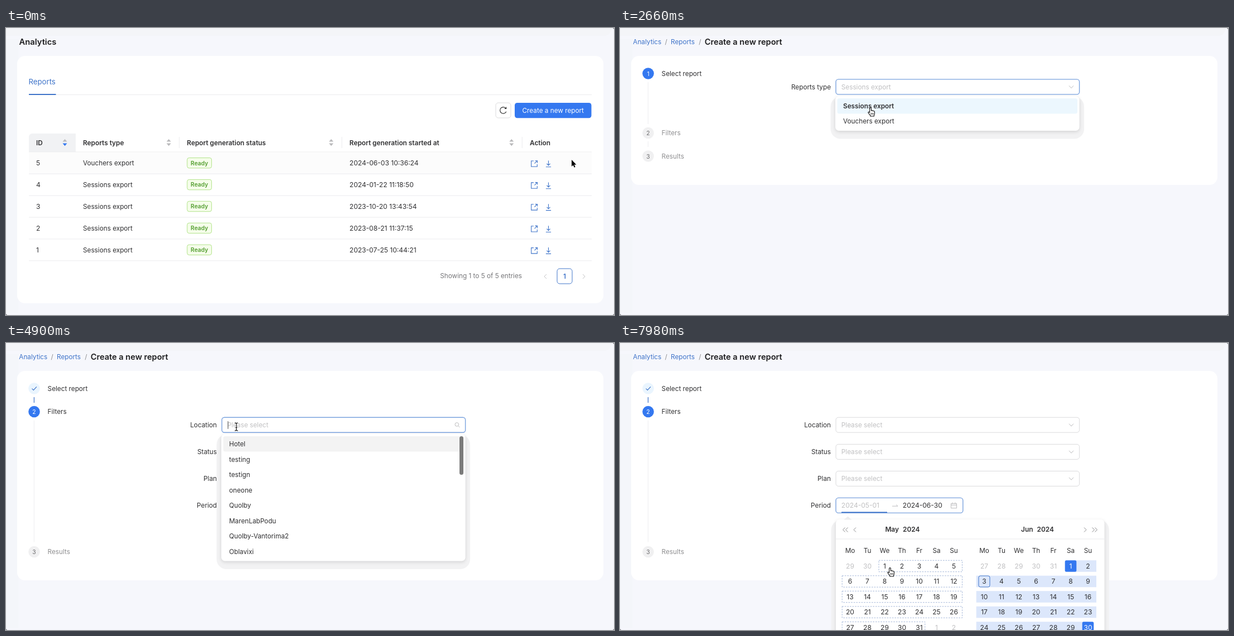
An HTML page with a canvas for the animation above (8 s loop, 1090 by 514 pixels).

```html
<!DOCTYPE html>
<html lang="en">
<head>
<meta charset="utf-8">
<title>Create a new report</title>
<style>
html, body { margin: 0; width: 100%; height: 100%; overflow: hidden; background: #f6f7fc; }
canvas { display: block; width: 1090px; height: 514px; }
</style>
</head>
<body>
<canvas id="stage" width="1090" height="514"></canvas>
<script>
const ctx = document.getElementById('stage').getContext('2d');
const LOOP = 8000, TICK = 70;
const INK = '#303032', MUTED = '#8f8f91', HINT = '#c0c0c2', LINE = '#dadadc', RULE = '#ececee';
const BLUE = '#3478f0', LINK = '#3f74c9', FOCUS = '#7ba3de';

// moments of the story, in ms
const PAGE2 = 1400, LIST1_OPEN = 2380, LIST1_CLOSE = 2940, STEP2 = 3780, LOADED = 4340,
  LIST2_OPEN = 4550, LIST2_CLOSE = 5670, CAL_OPEN = 6160, PREV_MONTH = 6930;

// pointer path: time, x, y
const PATH = [
  [0, 1014, 236], [140, 1030, 250], [280, 900, 303], [420, 640, 310], [560, 420, 255],
  [660, 335, 195], [740, 350, 152], [840, 365, 180], [910, 349, 200], [980, 400, 227],
  [1120, 760, 195], [1260, 984, 147], [1400, 984, 147], [1680, 770, 112], [1750, 770, 112],
  [1960, 379, 92], [2100, 240, 84], [2240, 300, 96], [2380, 440, 106], [2590, 447, 136],
  [2660, 449, 143], [2730, 462, 161], [2800, 455, 150], [2940, 455, 150], [3150, 560, 180],
  [3430, 770, 160], [3570, 797, 154], [3780, 790, 156], [4060, 506, 170], [4340, 440, 158],
  [4550, 412, 150], [4830, 412, 150], [4900, 413, 150], [5040, 413, 150], [5250, 440, 205],
  [5390, 455, 235], [5600, 420, 150], [5740, 420, 150], [6090, 424, 291], [6510, 424, 291],
  [6720, 421, 334], [7280, 421, 335], [7490, 430, 380], [7700, 470, 430], [7910, 484, 403], [7980, 484, 403]
];

const ICONS = {
  open: 'M-1-5H-5.3V5.3H5.3V1M1.5-5.3H5.5V-1.3M5.3-5.1L.5-.3',
  down: 'M0-5.5V3M-3 0L0 3L3 0M-4.6 5.8H4.6',
  reload: 'M5.3 2.2A5.8 5.8 0 1 1 4.6-3.6M5.2-6V-3.1H2.3',
  chevron: 'M-4-2.2L0 2.2L4-2.2',
  search: 'M2.6-.9A3.3 3.3 0 1 1-4-.9A3.3 3.3 0 1 1 2.6-.9M1.8 1.7L4.4 4.3',
  check: 'M-4 .2L-1.2 3L4.4-3.2',
  to: 'M-5 1.2H5L2.2-1.4',
  date: 'M-5-3.6H5V4.8H-5ZM-5-.8H5M-2.4-5.4V-2.6M2.4-5.4V-2.6',
  cross: 'M-1.9-1.9L1.9 1.9M1.9-1.9L-1.9 1.9',
  left: 'M2-4L-2 0L2 4',
  right: 'M-2-4L2 0L-2 4'
};
for (const k in ICONS) ICONS[k] = new Path2D(ICONS[k]);
const ARROW = new Path2D('M0 0V12L2.8 9.4L4.7 13.8L6.6 13L4.7 8.7H8.4Z');
const HAND = new Path2D('M-1.4 1a1.4 1.4 0 0 1 2.8 0V5q1.3-.8 2.2.3q1.3-.6 2 .5q1.7-.2 1.8 1.4V10q0 2-1 3.4V15H-.2V13.6L-3.6 9.3q-1.1-1.6.3-2q.9-.1 1.9 1.2Z');
const BEAM = new Path2D('M-3-7Q0-7 0-5.4Q0-7 3-7M0-5.6V5.6M-3 7Q0 7 0 5.4Q0 7 3 7M-1.6 1.5H1.6');

const clamp = v => Math.max(0, Math.min(1, v));
const inside = (p, x, y, w, h) => p.x >= x && p.x <= x + w && p.y >= y && p.y <= y + h;

function text(s, x, mid, o = {}) {
  const { size = 11.75, color = INK, weight = 400, align = 'left' } = o;
  ctx.font = `${weight} ${size}px Inter, "Noto Sans", sans-serif`;
  ctx.textAlign = align;
  ctx.fillStyle = color;
  ctx.fillText(s, x, mid + size * 0.364);
}
function box(x, y, w, h, r, fill, stroke, lw = 1) {
  ctx.beginPath();
  ctx.roundRect(x, y, w, h, r);
  if (fill) { ctx.fillStyle = fill; ctx.fill(); }
  if (stroke) { ctx.strokeStyle = stroke; ctx.lineWidth = lw; ctx.stroke(); }
}
function rect(x, y, w, h, color) {
  ctx.fillStyle = color;
  ctx.fillRect(x, y, w, h);
}
function disc(x, y, r, color) {
  ctx.beginPath();
  ctx.arc(x, y, r, 0, 7);
  ctx.fillStyle = color;
  ctx.fill();
}
function icon(name, x, y, color, lw = 1) {
  ctx.save();
  ctx.translate(x, y);
  ctx.strokeStyle = color;
  ctx.lineWidth = lw;
  ctx.stroke(ICONS[name]);
  ctx.restore();
}
function triangle(x, y, w, h, color) {
  ctx.beginPath();
  ctx.moveTo(x - w, y);
  ctx.lineTo(x + w, y);
  ctx.lineTo(x, y + h);
  ctx.fillStyle = color;
  ctx.fill();
}
function button(label, x, y, w, fill, color, border) {
  box(x, y, w, 27.2, 4.5, fill, border);
  text(label, x + w / 2, y + 13.6, { color, align: 'center' });
}

function pointer(t) {
  let i = 1;
  while (i < PATH.length - 1 && PATH[i][0] < t) i++;
  const [t0, x0, y0] = PATH[i - 1], [t1, x1, y1] = PATH[i];
  const k = clamp((t - t0) / (t1 - t0));
  return { x: x0 + (x1 - x0) * k, y: y0 + (y1 - y0) * k };
}

function page(cardBottom) {
  rect(0, 0, 1090, 514, '#55575c');
  box(0, 0, 1090, 514, 3, '#f6f7fc');
  rect(0, 20, 22, 490, '#f4f6fa');
  box(-20, -20, 1106, 34, 14, '#f4f5f8');
  box(20, 50, 1051, cardBottom - 50, 14, '#fff');
}

function sorter(x, active) {
  triangle(x, 203.6, 4, -4.6, '#b9b9bb');
  triangle(x, 206.6, 4, 4.6, active ? BLUE : '#b9b9bb');
}

function reports(p) {
  page(493);
  text('Analytics', 23.5, 24.5, { size: 14.75, weight: 600, color: '#1d1d1f' });
  text('Reports', 40.5, 96, { size: 13.2, color: LINK });
  rect(41, 119, 1009, 1, RULE);
  rect(41, 118, 48.5, 2, LINK);
  box(878, 134, 27, 27, 4.5, '#fff', LINE);
  icon('reload', 891.5, 147.5, '#333', 1.2);
  const hover = inside(p, 912, 134, 138, 27);
  button('Create a new report', 912, 134, 137.5, hover ? '#5a92f5' : BLUE, '#fff');

  box(41, 189, 84, 33, [6, 0, 0, 0], '#f1f2f4');
  const heads = [['ID', 54, 105.5], ['Reports type', 138, 291.8], ['Report generation status', 324.3, 583],
    ['Report generation started at', 615.8, 906.3], ['Action', 939]];
  heads.forEach(([s, x, sx], i) => {
    text(s, x, 205.5, { size: 11.85, weight: 600 });
    if (sx) sorter(sx, i === 0);
    if (i > 1) rect(x - 14.2, 195, 1, 20, RULE);
  });
  rect(41, 221.5, 1009, 1, RULE);

  const dates = ['2024-06-03 10:36:24', '2024-01-22 11:18:50', '2023-10-20 13:43:54',
    '2023-08-21 11:37:15', '2023-07-25 10:44:21'];
  dates.forEach((d, i) => {
    const y = 241.8 + i * 38.9;
    if (Math.abs(p.y - y) < 19.4 && p.x > 41) rect(41, y - 19, 1009, 38, '#fcfcfc');
    text(String(5 - i), 54, y, { size: 12.05 });
    text(i ? 'Sessions export' : 'Vouchers export', 138, y);
    box(324.8, y - 9.3, 43.8, 18.4, 3.5, '#f5fdea', '#b3e48b');
    text('Ready', 346.7, y, { size: 10.3, weight: 600, color: '#559f31', align: 'center' });
    text(d, 615.8, y, { size: 12.05 });
    icon('open', 947, y + 1.2, LINK, 1.1);
    icon('down', 972.5, y + 1.2, LINK, 1.1);
    rect(41, y + 18.9, 1009, 1, RULE);
  });
  text('Showing 1 to 5 of 5 entries', 778.3, 444, { color: '#77777a' });
  icon('left', 967, 445, '#c4c4c6');
  box(988, 431, 27, 27, 4.5, '#fff', LINK);
  text('1', 1001.5, 444.5, { weight: 600, color: LINK, align: 'center' });
  icon('right', 1036, 445, '#c4c4c6');
}

function crumbs() {
  text('Analytics', 23.3, 25, { color: LINK });
  text('/', 80.5, 25, { color: MUTED });
  text('Reports', 91, 25, { color: LINK });
  text('/', 141.2, 25, { color: MUTED });
  text('Create a new report', 151.8, 24.8, { size: 14.55, weight: 600, color: '#1d1d1f' });
}

function step(n, label, y, state) {
  const on = state === 'on', done = state === 'done';
  disc(50.5, y, 10.3, on ? BLUE : done ? '#eaf5fe' : '#f0f0f1');
  if (done) icon('check', 50.5, y, LINK, 1.2);
  else text(String(n), 50.5, y + 0.3, { size: 10.3, color: on ? '#fff' : '#6c6c6e', align: 'center' });
  text(label, 74.6, y, { color: on || done ? INK : MUTED });
}

function field(label, y, o = {}) {
  const { value = 'Please select', color = HINT, focus, glyph = 'chevron', w = 436.6 } = o;
  text(label, 378, y, { align: 'right' });
  box(387, y - 13.6, w, 27, 4.5, '#fff', focus ? FOCUS : LINE, focus ? 1.4 : 1);
  if (value) text(value, 396.8, y, { color });
  if (glyph) icon(glyph, 809, y, '#bcbcbe');
}

// fading panel that unrolls from its top edge
function popup(t, open, close, x, y, w, h, draw) {
  const k = Math.min(clamp((t - open) / 170), 1 - clamp((t - close) / 170));
  if (k <= 0) return;
  ctx.save();
  ctx.globalAlpha = k;
  ctx.translate(0, y);
  ctx.scale(1, 0.8 + 0.2 * k);
  ctx.translate(0, -y);
  box(x - 8.5, y + 1, w + 17, h + 13.5, 18, '#f2f2f3');
  ctx.save();
  ctx.shadowColor = 'rgba(0,0,0,.13)';
  ctx.shadowBlur = 6;
  ctx.shadowOffsetY = 2;
  box(x, y, w, h, 6.5, '#fff');
  ctx.restore();
  draw();
  ctx.restore();
}

function select(t, p) {
  page(281);
  crumbs();
  rect(49.8, 97, 1, 75, '#eeeeef');
  rect(49.8, 203, 1, 10, '#eeeeef');
  step(1, 'Select report', 81.5, 'on');
  step(2, 'Filters', 188);
  step(3, 'Results', 229.5);
  const open = t >= LIST1_OPEN && t < LIST1_CLOSE;
  field('Reports type', 105.5, {
    value: 'Sessions export', color: open ? HINT : INK, focus: t >= LIST1_OPEN && t < 3640
  });
  const hover = !open && inside(p, 771, 140, 53, 27);
  button('Next', 770.8, 140, 53, hover ? '#5a92f5' : BLUE, '#fff');
  popup(t, LIST1_OPEN, LIST1_CLOSE, 386, 122, 437.6, 62, () => {
    box(389.5, 126, 430.5, 27.4, 3.5, '#ecf7fe');
    if (p.y > 153.5) box(389.5, 153.5, 430.5, 27.4, 3.5, '#f4f4f4');
    text('Sessions export', 400, 139.5, { weight: 600 });
    text('Vouchers export', 400, 167);
  });
}

function spinner(t) {
  for (let i = 0; i < 4; i++) {
    const a = (-22 + (t - 4060) * 0.3 + i * 90) * Math.PI / 180;
    const glow = Math.max(0, Math.cos((t - 4060) * Math.PI / 1000 - i * Math.PI / 2));
    disc(605 + 6.4 * Math.cos(a), 242.8 + 6.4 * Math.sin(a), 3, `rgba(62,116,205,${0.32 + 0.25 * glow})`);
  }
}

function period(t, p, hoverDay) {
  const ready = t >= LOADED, open = t >= CAL_OPEN;
  const over = inside(p, 387, 277, 228, 28) && ready;
  field('Period', 291, { value: '', glyph: '', w: 227.8, focus: open || over });
  const num = { size: 12.05 };
  if (!ready) text('Start date', 396.8, 291, { color: HINT });
  else if (hoverDay) text('2024-05-' + String(hoverDay).padStart(2, '0'), 396.8, 291, { size: 12.05, color: HINT });
  else text('2024-06-01', 396.8, 291, num);
  if (ready) text('2024-06-30', 506.8, 291, num);
  else text('End date', 506.8, 291, { color: HINT });
  icon('to', 493, 291, '#bcbcbe');
  if (over) {
    disc(598.5, 291, 5.8, '#bfbfc1');
    icon('cross', 598.5, 291, '#fff', 1.1);
  } else icon('date', 598.5, 291, '#bcbcbe');
  if (open) rect(397, 302.4, 82, 1.8, LINK);
}

const CELL_X = 31, CELL_Y = 27.5, ROW0 = 399.5;

function dayAt(p) {
  const col = Math.floor((p.x - 397) / CELL_X), row = Math.floor((p.y - 386) / CELL_Y);
  const d = row * 7 + col - 1;
  return row >= 0 && col >= 0 && col < 7 && d >= 1 && d <= 31 ? d : 0;
}

function month(x, name, offset, days, before, o = {}) {
  const l = x - 14.3, r = x + 6 * CELL_X + 15;
  text(name, x + 87.5, 333.5, { size: 11.9, weight: 600, align: 'right' });
  text('2024', x + 94.5, 333.5, { size: 11.9, weight: 600 });
  ['Mo', 'Tu', 'We', 'Th', 'Fr', 'Sa', 'Su'].forEach((s, i) =>
    text(s, x + i * CELL_X, 372, { align: 'center' }));
  for (let row = 0; row < 5; row++) {
    const y = ROW0 + row * CELL_Y, first = row * 7 - offset + 1;
    if (o.range) {
      const from = row ? l : x + offset * CELL_X, to = row < 4 ? r : x + 6 * CELL_X;
      rect(from, y - 10.3, to - from, 20.6, '#dce7fb');
    }
    if (o.from && first + 6 >= o.from) {
      const a = Math.max(0, o.from - first), b = Math.min(6, days - first);
      const x0 = a ? x + a * CELL_X - 10.5 : l, x1 = b < 6 ? x + b * CELL_X + 10.3 : r;
      ctx.setLineDash([2.6, 2]);
      box(x0, y - 10.2, x1 - x0, 20.4, 0, null, '#a3b6d8');
      ctx.setLineDash([]);
    }
    for (let col = 0; col < 7; col++) {
      const d = first + col, cx = x + col * CELL_X, end = o.range && (d === 1 || d === 30);
      if (end) box(cx - 10.3, y - 10.3, 20.6, 20.6, 2.5, BLUE);
      if (o.range && d === 3) box(cx - 10, y - 10, 20, 20, 3, null, LINK);
      const shown = d < 1 ? before + d : d > days ? d - days : d;
      const color = end ? '#fff' : d < 1 || d > days ? HINT : INK;
      text(String(shown), cx, y, { size: 12.05, color, align: 'center' });
    }
  }
}

function calendar(t, hoverDay) {
  popup(t, CAL_OPEN, LOOP + 999, 387, 316, 481.5, 260, () => {
    triangle(408.5, 316.5, 7, -6, '#ededee');
    [401.5, 406.5, 421].forEach(x => icon('left', x, 334.5, '#8a8a8c'));
    [834, 848.5, 853.5].forEach(x => icon('right', x, 334.5, '#8a8a8c'));
    rect(387, 350.5, 481.5, 1, RULE);
    if (t < PREV_MONTH) {
      month(412.5, 'Jun', 5, 30, 31, { range: true });
      month(653, 'Jul', 0, 31, 30);
    } else {
      month(412.5, 'May', 2, 31, 30, { from: hoverDay });
      month(653, 'Jun', 5, 30, 31, { range: true });
    }
  });
}

const PLACES = ['Hotel', 'testing', 'testign', 'oneone', 'Quolby', 'MarenLabPodu', 'Quolby-Vantorima2', 'Oblavixi'];

function places(t, p) {
  popup(t, LIST2_OPEN, LIST2_CLOSE, 386, 163, 437.6, 227.5, () => {
    const active = p.y > 167 ? Math.min(7, Math.floor((p.y - 167) / 27.5)) : 0;
    box(389.5, 167 + active * 27.5, 430.5, 27.4, 3.5, '#f3f3f3');
    PLACES.forEach((s, i) => text(s, 400, 180.8 + i * 27.5));
    box(813, 167, 7, 69, 3.5, '#7b7b7b');
  });
}

function filters(t, p) {
  page(425);
  crumbs();
  rect(49.8, 97, 1.2, 10, LINK);
  rect(49.8, 138.5, 1, 218, '#eeeeef');
  step(1, 'Select report', 81.5, 'done');
  step(2, 'Filters', 123, 'on');
  step(3, 'Results', 374);
  const hoverDay = t >= PREV_MONTH ? dayAt(p) : 0;
  const listOpen = t >= LIST2_OPEN && t < LIST2_CLOSE, focus = t >= LIST2_OPEN && t < CAL_OPEN;
  ctx.globalAlpha = 0.3 + 0.7 * clamp((t - LOADED) / 150);
  field('Location', 146.8, { focus, glyph: listOpen ? 'search' : 'chevron' });
  if (focus) rect(397.5, 140, 1, 14, '#555');
  field('Status', 195);
  field('Plan', 243);
  period(t, p, hoverDay);
  button('Back', 709.5, 325.5, 54, '#fff', INK, LINE);
  button('Next', 770.8, 325.5, 53, BLUE, '#fff');
  ctx.globalAlpha = 1;
  if (t < LOADED + 100) spinner(t);
  places(t, p);
  calendar(t, hoverDay);
}

function shape(t, p) {
  if (t < PAGE2) return inside(p, 912, 134, 138, 27) ? 'hand' : 'arrow';
  if (t < STEP2) {
    const list = t >= LIST1_OPEN && t < LIST1_CLOSE && inside(p, 386, 122, 438, 62);
    return list || inside(p, 387, 92, 437, 27) || inside(p, 771, 140, 53, 27) ? 'hand' : 'arrow';
  }
  if (t < LOADED) return 'arrow';
  if (t >= LIST2_OPEN && t < LIST2_CLOSE && p.y > 163) return 'hand';
  if (inside(p, 387, 133, 437, 27) || inside(p, 387, 277, 200, 28)) return 'beam';
  if (t < LIST2_CLOSE) return 'arrow';
  return dayAt(p) || inside(p, 397, 327, 30, 14) ? 'hand' : 'arrow';
}

function drawPointer(t, p) {
  const kind = shape(t, p);
  ctx.save();
  ctx.translate(p.x, p.y);
  ctx.lineJoin = 'round';
  if (kind === 'arrow') {
    ctx.strokeStyle = '#fff';
    ctx.lineWidth = 1.8;
    ctx.stroke(ARROW);
    ctx.fillStyle = '#000';
    ctx.fill(ARROW);
  } else if (kind === 'hand') {
    ctx.fillStyle = '#fff';
    ctx.fill(HAND);
    ctx.strokeStyle = '#111';
    ctx.lineWidth = 1.1;
    ctx.stroke(HAND);
    ctx.lineWidth = 0.8;
    ctx.stroke(new Path2D('M1 9V12.2M3 9V12.2M5 9V12.2'));
  } else {
    ctx.strokeStyle = '#fff';
    ctx.lineWidth = 2.6;
    ctx.stroke(BEAM);
    ctx.strokeStyle = '#111';
    ctx.lineWidth = 1.2;
    ctx.stroke(BEAM);
  }
  ctx.restore();
}

const begin = performance.now();
function frame() {
  const now = Math.max(0, performance.now() - begin) % LOOP;
  const t = Math.floor(now / TICK) * TICK;
  const p = pointer(t);
  if (t < PAGE2) reports(p);
  else if (t < STEP2) select(t, p);
  else filters(t, p);
  drawPointer(t, p);
  requestAnimationFrame(frame);
}
frame();
</script>
</body>
</html>
```
